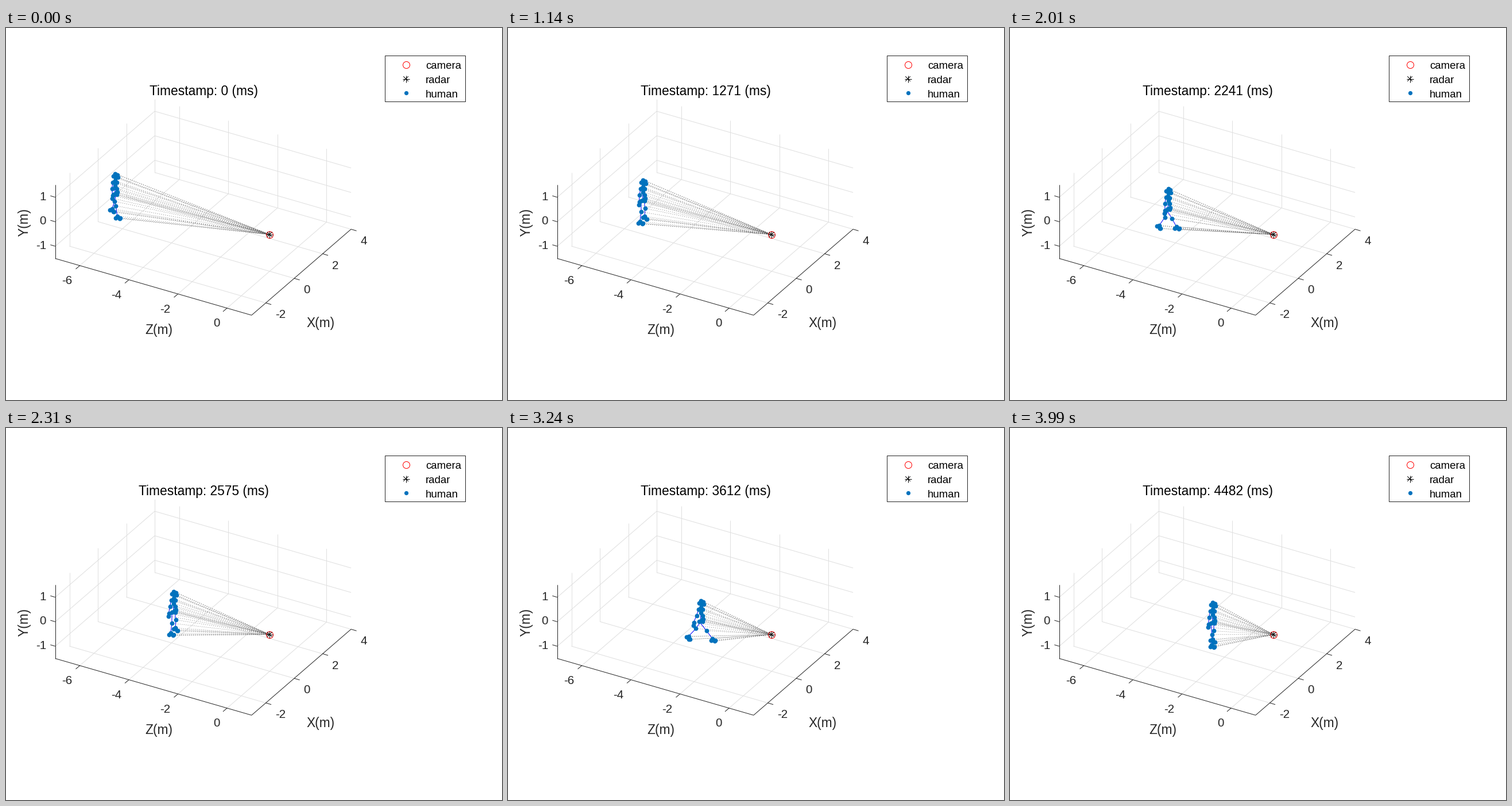
Write a matplotlib script that moves like this. It is 864 px wide and 648 px high and loops after 4.02 s.

```python
import numpy as np
import matplotlib.pyplot as plt
from matplotlib.animation import FuncAnimation
from matplotlib.collections import LineCollection
from matplotlib.patches import Rectangle

W, H, DPI = 864, 648, 100
FRAMES, STEP = 134, 30
PT = 72 / DPI
INK, GRID, DOT = "#262626", "#dfdfdf", "#0072bd"
TICK_PX, LABEL_PX, LEGEND_PX = 20.7, 22.8, 18.7

plt.rcParams["font.family"] = "Liberation Sans"
fig = plt.figure(figsize=(W / DPI, H / DPI), dpi=DPI, facecolor="white")
ax = fig.add_axes([0, 0, 1, 1])
ax.set_xlim(0.5, W + 0.5)
ax.set_ylim(H + 0.5, 0.5)
ax.axis("off")


def project(x, y, z):
    """Metres to stage pixels, orthographic view."""
    u, v = x + 3, z + 7
    return (86.3 + 24.75 * u + 42.75 * v,
            402 - 21.4 * u + 12.35 * v - 42.67 * (y + 1.5))


def line(p, q, color=INK, width=1.0, z=2):
    ax.plot([p[0], q[0]], [p[1], q[1]], color=color, lw=width * PT,
            zorder=z, solid_capstyle="butt")


def label(x, y, s, px, color=INK, ha="center", **kw):
    return ax.text(x, y, s, fontsize=px * PT, color=color, ha=ha,
                   va="baseline", zorder=8, **kw)


def tick(p, dx, dy):
    line(p, (p[0] + dx, p[1] + dy))


def ring(x, y):
    ax.plot(x, y, "o", ms=12 * PT, mfc="none", mec="red", mew=PT, zorder=7)


def star(x, y):
    for a in np.arange(4) * np.pi / 4:
        dx, dy = 6 * np.cos(a), 6 * np.sin(a)
        line((x - dx, y - dy), (x + dx, y + dy), "black", z=7)


# Grid, ticks and tick labels
for z in (-6, -4, -2, 0):
    line(project(-3, -1.5, z), project(4, -1.5, z), GRID, z=1)
    line(project(4, -1.5, z), project(4, 1.5, z), GRID, z=1)
    p = project(-3, -1.5, z)
    tick(p, -7, 6)
    label(p[0] - (22 if z else 18.5), p[1] + 32.3, str(z), TICK_PX)
for x in (-2, 0, 2, 4):
    line(project(x, -1.5, -7), project(x, -1.5, 1), GRID, z=1)
    line(project(x, -1.5, -7), project(x, 1.5, -7), GRID, z=1)
    p = project(x, -1.5, 1)
    tick(p, 9.5, 2.8)
    label(p[0] + (25.5 if x < 0 else 22), p[1] + 26.2, str(x), TICK_PX)
for y in (-1, 0, 1):
    line(project(-3, y, -7), project(4, y, -7), GRID, z=1)
    line(project(4, y, -7), project(4, y, 1), GRID, z=1)
    p = project(-3, y, -7)
    tick(p, -8.5, -2.5)
    label(70.5, p[1] + 4.8, str(y), TICK_PX, ha="right")

corners = [project(-3, 1.5, -7), project(-3, -1.5, -7),
           project(-3, -1.5, 1), project(4, -1.5, 1)]
for p, q in zip(corners, corners[1:]):
    line(p, q)

label(267, 534, "Z(m)", LABEL_PX)
label(548.5, 522, "X(m)", LABEL_PX)
label(39.5, 338.5, "Y(m)", LABEL_PX, rotation=90, rotation_mode="anchor")
title = label(345.3, 117, "", LABEL_PX, "black")

# Legend
ax.add_patch(Rectangle((660, 48), 140, 80, fc="white", ec=INK, lw=PT, zorder=6))
ring(697, 64)
star(697, 89)
ax.plot(697, 113.5, "o", ms=7.2 * PT, mfc=DOT, mec="none", zorder=7)
for i, name in enumerate(("camera", "radar", "human")):
    label(731.5, 71.3 + 25 * i, name, LEGEND_PX, "black", ha="left")

RADAR = np.array(project(0, 0, 0))
ring(*RADAR)
star(*RADAR)

# Walk keys: pelvis path, step phase, stride reach and near-hand offset
KEYS = [0, 20, 38, 57, 77, 108, 133]
ROOT_X = [190, 211, 235, 259, 292, 336, 353]
ROOT_Y = [289, 295, 300, 311, 320, 336, 339]
PHASE = [0.38, 1.425, 2.55, 3.4, 4.55, 5.98, 6.49]
REACH = [17, 17, 17, 17, 17, 23, 23]
HAND = [-4, -5, -6, -2, -8, -12, -7]

HEAD = [(1, -28), (-3, -31), (0.5, -35), (4, -33), (5, -28.5)]
FOOT = np.array([(-1, -3), (-3.5, 0), (3, 1), (4, 0)])  # ankle, heel, toes


def leg(phase, reach, side):
    lat = 1 if side else -1
    t = phase % 1
    swing = int(phase) % 2 != side
    c, s = np.cos(np.pi * t), np.sin(np.pi * t)
    off = -reach * c if swing else reach * c
    if swing:
        y = 41 + 0.1 * off - 9 * abs(c) - 7 * s
        pitch = 0.7 * (1 - t)
    else:
        y = 41 + 0.25 * off - 4 * abs(c) - 9 * max(0, 1 - t / 0.12)
        pitch = 0.7 * max(0, (t - 0.7) / 0.3)
    cp, sp = np.cos(pitch), np.sin(pitch)
    foot = FOOT @ np.array([[cp, sp], [-sp, cp]]) + (off + lat, y - lat)
    hip = np.array([2.5 * lat, -1.5 * lat])
    knee = (hip + foot[0]) / 2 + (1, 1)
    return hip, knee, foot


def pose(n):
    at = lambda vals: np.interp(n, KEYS, vals)
    root = np.array([at(ROOT_X), at(ROOT_Y)])
    neck, spine, pelvis = (0, -22.5), (0.5, -14), (0, 0)
    hand = at(HAND)
    arms = [
        [(-3.5, -20), (-4 + 0.25 * hand, -9), (hand, 3), (hand - 0.7, 8)],
        [(3, -19.5), (3, -9), (4, -2.5), (3, 1)],
    ]
    bones = [[HEAD[0], neck, spine, pelvis],
             [HEAD[1], HEAD[2], HEAD[0], HEAD[3], HEAD[4]]]
    joints = HEAD + [neck, spine, pelvis]
    for side in (0, 1):
        hip, knee, foot = leg(at(PHASE), at(REACH), side)
        bones += [[neck] + arms[side], [pelvis, hip, knee, foot[0], foot[1]],
                  [foot[0], foot[2], foot[3]]]
        joints = joints + arms[side] + [hip, knee, *foot]
    return np.array(joints) + root, [np.array(b) + root for b in bones]


rays = LineCollection([], colors="0.3", linewidths=0.7 * PT,
                      linestyles=[(0, (1.4, 3.6))], zorder=3)
limbs = LineCollection([], colors="blue", linewidths=PT, zorder=4)
ax.add_collection(rays, autolim=False)
ax.add_collection(limbs, autolim=False)
dots, = ax.plot([], [], "o", ms=7.8 * PT, mfc=DOT, mec="none", zorder=5)


def update(n):
    joints, bones = pose(n)
    rays.set_segments([np.array([j, RADAR]) for j in joints])
    limbs.set_segments(bones)
    dots.set_data(joints[:, 0], joints[:, 1])
    # One capture was dropped late in the walk
    tick_no = n + (n > 120)
    title.set_text(f"Timestamp: {round(33.445 * tick_no)} (ms)")
    return rays, limbs, dots, title


anim = FuncAnimation(fig, update, frames=FRAMES, interval=STEP,
                     repeat=True, repeat_delay=0, blit=False)
plt.show()
```
